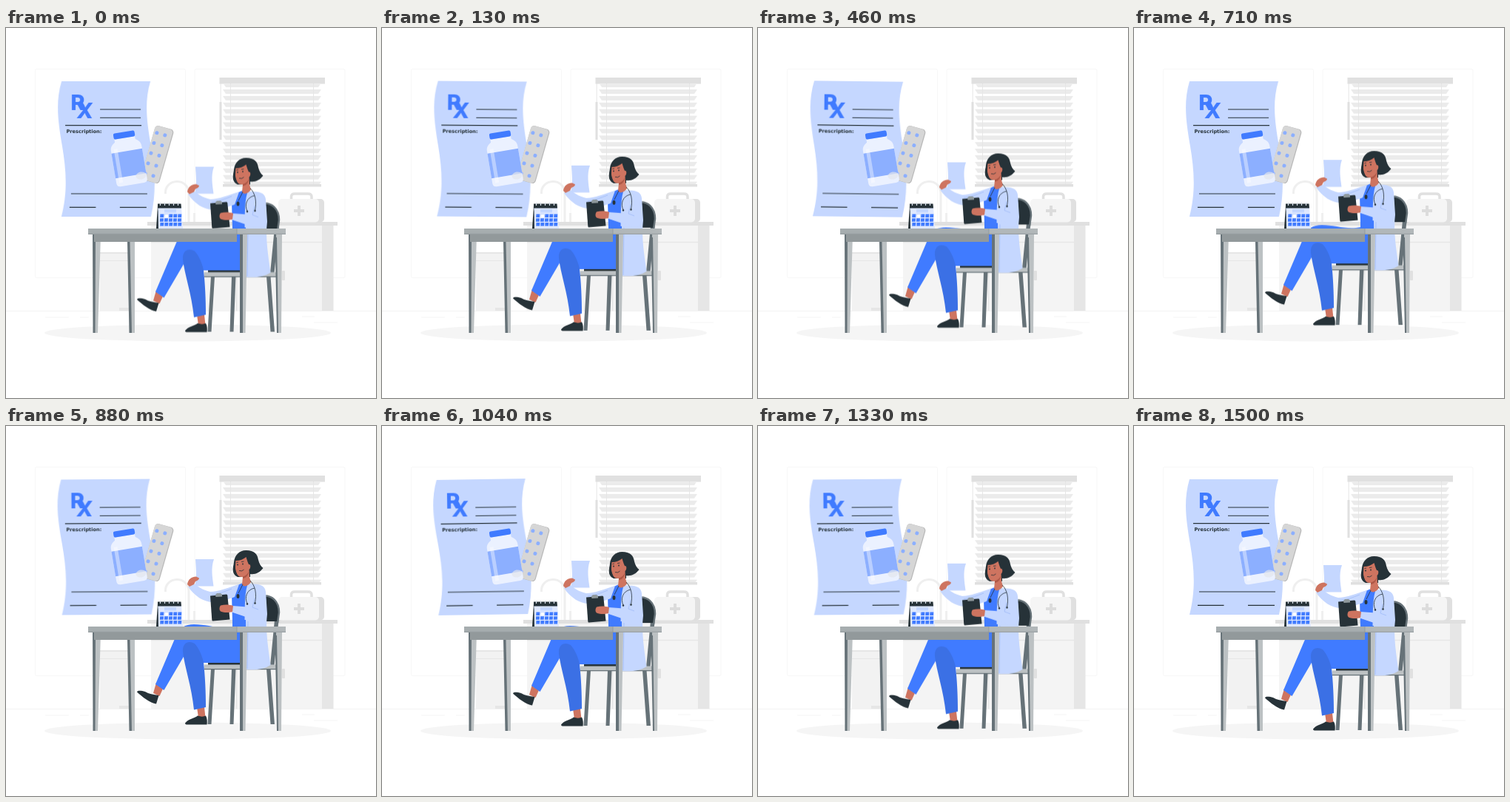
Animation, 500 px wide and 500 px high, one loop 1.54 s. Source, as an HTML page:

```html
<!DOCTYPE html>
<html lang="en">
<head>
<meta charset="utf-8">
<title>Doctor reading a prescription</title>
<style>
  html, body { margin: 0; width: 100%; height: 100%; overflow: hidden; background: #fff; }
  svg { display: block; width: 100%; height: 100%; }
  .float { animation: float 1540ms linear -40ms infinite; }
  .wind { animation: wind 1540ms linear -40ms infinite; transform-origin: 135px 163.5px; }
  @keyframes float { 50% { transform: translateY(-10px); } }
  @keyframes wind {
    0%, 100% { transform: rotate(0deg); }
    25% { transform: rotate(1deg); }
    75% { transform: rotate(-1deg); }
  }
  .pale { fill: #c5d7ff; }
  .blue { fill: #407bff; }
  .soft { fill: #8cafff; }
  .dark { fill: #263238; }
  .skin { fill: #ce7460; }
  .steel { fill: #667278; }
  .silver { fill: #bcc1c3; }
  .ink { fill: none; stroke: #263238; stroke-width: 1.1; }
  .thin { fill: none; stroke: #263238; stroke-width: .8; }
  .fold { fill: none; stroke: #94b2f5; stroke-width: .6; }
  .rx { font: 800 29px Inter, "Open Sans", sans-serif; }
  .label { font: 700 6.6px "DejaVu Sans", sans-serif; }
</style>
</head>
<body>
<svg viewBox="0 0 500 500">
  <defs>
    <pattern id="slats" x="293" y="74.100" width="133" height="8.900" patternUnits="userSpaceOnUse">
      <path d="M0 0H133L129 6H4Z" fill="#ebebeb"/>
    </pattern>
    <path id="cell" d="M0 0H4.800L4.500 4.400H-.3Z"/>
    <g id="pair"><circle cx="-5.700" r="2.500"/><circle cx="5.700" r="2.500"/></g>
    <g id="week">
      <use href="#cell"/><use href="#cell" x="6"/><use href="#cell" x="12"/>
      <use href="#cell" x="18"/><use href="#cell" x="24"/>
    </g>
  </defs>

  <!-- room -->
  <g fill="none" stroke="#f7f7f7">
    <rect x="39.500" y="55.500" width="203" height="282" rx="2"/>
    <rect x="255" y="55.500" width="203" height="282" rx="2"/>
    <path d="M0 382.500H500" stroke="#f2f2f2"/>
    <path d="M53 391H85M100 391H112M400 390H417M416 398H448" stroke="#f5f5f5"/>
  </g>
  <ellipse cx="245.500" cy="412" rx="193.500" ry="11.500" fill="#f5f5f5"/>

  <!-- blinds -->
  <rect x="293" y="76" width="133" height="135" fill="url(#slats)"/>
  <path d="M303.500 75V211M415.500 75V211" stroke="#e6e6e6"/>
  <path d="M288.500 67H431V75.500H288.500ZM293 211H426V214.500H293ZM288.500 100H291.500V151H288.500ZM289.700 75H290.500V100H289.700Z" fill="#e0e0e0"/>

  <!-- cabinets -->
  <path d="M127 303H166V382H127Z" fill="#f2f2f2"/>
  <path d="M127 303H166V305H127ZM127 314H166V315H127Z" fill="#e6e6e6"/>
  <path d="M153 378H172V382H153Z" fill="#e6e6e6"/>
  <path d="M196 267H428V382H196Z" fill="#f4f4f4"/>
  <path d="M427 267H442.500V382H427Z" fill="#e6e6e6"/>
  <path d="M196 289.500H427M311.500 290V382" stroke="#e6e6e6" stroke-width="1.500"/>
  <path d="M191 262H448V267H191Z" fill="#e0e0e0"/>
  <rect x="373" y="328" width="4" height="13" rx="1" fill="#e0e0e0"/>
  <path d="M215.500 224C214 203 247 201 247 224V262M254.500 250V262" fill="none" stroke="#efefef" stroke-width="3"/>
  <path d="M385.500 233V228Q385.500 224 390 224H408Q413 224 413 228V233" fill="none" stroke="#e0e0e0" stroke-width="3.500"/>
  <rect x="372" y="231" width="58" height="31.500" rx="5" fill="#e0e0e0"/>
  <rect x="368" y="231" width="55" height="31.500" rx="5" fill="#f5f5f5"/>
  <path d="M394 240H398V245H403V249H398V254H394V249H389V245H394Z" fill="#dcdcdc"/>

  <!-- prescription sheet -->
  <g class="wind">
    <path class="pale" d="M75 72H195C186 102 191 130 196 160S204 220 196 255H75C84 220 81 190 76 160S66 102 75 72Z"/>
    <text class="blue rx" x="87.200" y="111">R</text>
    <text class="blue rx" x="95" y="122" transform="translate(10.500) skewX(-5)">X</text>
    <path class="ink" d="M127 110H182M127 121.300H182M80 131.600H183M88 224H191M86 242.400H121.500M154 242.400H190"/>
    <text class="dark label" x="81.500" y="142.200">Prescription:</text>
  </g>

  <!-- blister pack -->
  <g transform="translate(204.500 171) rotate(16)">
    <rect x="-13" y="-38" width="26" height="76" rx="4.500" fill="#b8b8b8"/>
    <rect x="-13.200" y="-37.700" width="25" height="75.400" rx="4.500" fill="#d6d6d6"/>
    <g class="soft" transform="translate(-3 -28)">
      <use href="#pair"/><use href="#pair" y="14.300"/><use href="#pair" y="28.600"/>
      <use href="#pair" y="42.900"/><use href="#pair" y="57.200"/>
    </g>
  </g>

  <!-- bottle -->
  <g transform="translate(165.500 180) rotate(-9.500)">
    <path d="M-14 -32H14V-28C19 -25 21 -22 21 -17V27Q21 32 16 32H-16Q-21 32 -21 27V-17C-21 -22 -19 -25 -14 -28Z" fill="#ebf1ff"/>
    <path class="soft" d="M-21 -14H21V20H-21Z"/>
    <path d="M-17 -19H-12V27H-17Z" fill="#fff" opacity=".4"/>
    <rect class="blue" x="-14.500" y="-40" width="29" height="8" rx="2"/>
  </g>
  <ellipse cx="182.500" cy="199.500" rx="7" ry="5" transform="rotate(-12 182.500 199.500)" fill="#e3e6ec" opacity=".7"/>

  <!-- chair and doctor -->
  <g class="float">
    <path class="steel" d="M277 336H282L277.500 411H272.500ZM305 336H310.500L307.500 411H302.500ZM352 336H357.500L363 411H357.500ZM363 270H368.500L362.500 332H357Z"/>
    <path class="dark" d="M344 239C358 235 369 245 369 260L367 272H344Z"/>
    <path d="M345 238C360 235 369 246 369 260L367 274" fill="none" stroke="#667278" stroke-width="2.500"/>
    <path class="dark" d="M273 327H330V332H273Z"/>
    <path class="silver" d="M268 330.500H366V336.500H268Z"/>
    <path class="steel" d="M268 336H366V337.200H268Z"/>

    <path class="skin" d="M203 355L213 361L207.500 373L199 369Z"/>
    <path class="dark" d="M177 367.500C177 365 183 365.500 188 367C193 370 199 371 206.500 372L203 383.500C195 382.500 184 374 177 367.500Z"/>
    <path class="skin" d="M258 388H268L269.500 402H260Z"/>
    <path class="dark" d="M242 409.500C246 404 255 403 259 399.500C263 401 267 401 270 399.500C272 403 272 408 271.500 411.500H244Q242 411.500 242 409.500Z"/>
    <path class="blue" d="M326 262V328H262L241 318L213.500 365L202 357L230 291C234 281 242 276 254 276C272 276 288 283 306 279V262Z"/>
    <path d="M239 313C238 301 247 297 255 302C261 309 265 318 267 328C269 345 270 368 270 388L254 391.500C251 360 241 333 239 313Z" fill="#3b70e5"/>

    <path class="pale" d="M305 227C314 221 322 221 334 221.500C346 222 350 225 351 232L353 262C350 284 355 312 357.500 331C349 337 336 338 325 337L324 270H306Z"/>
    <path class="fold" d="M327 272L326 336"/>
    <path class="blue" d="M313 223L320 220L328 218C322 231 323 251 322.500 272H306L305 232Z"/>

    <path class="pale" d="M256 188H281C276.500 200 279 213 280.500 224.500H255C258.500 212 256.500 199 256 188Z"/>
    <path class="pale" d="M315 222C301 226 287 232 276 232C266 230 258 224 253 220L246 225C255 238 267 246 280 246C291 246 300 242 309 239Z"/>
    <path class="fold" d="M278 236C288 235 297 231 305 228"/>
    <path class="skin" d="M245 222C246 215 251 211.500 257 211.500L261 213.500Q261 216 256 218L254 222L248 225Z"/>

    <path class="dark" d="M276 237.500L298 235.500Q299 235.500 299.300 237L302.500 269.500L279.500 271.500Q278.500 271.500 278.300 270Z"/>
    <path d="M283 236L285 234H290L292 235.500V238.500L283.500 239Z" fill="#8f999d"/>
    <path class="pale" d="M335 228C342 222 350 227 351 240C352 250 352 260 349 268C345 274 338 271 330 268L305 259.500L306 251L333 253Z"/>
    <path class="fold" d="M333 253L336 241M333 253L341 256"/>
    <path class="skin" d="M307 251C302 249 295 249 290 250.500C288 253 288 257 290 258.500C296 261 302 260 306 259Z"/>

    <path class="dark" d="M308 192C309 182 316 175.500 325 176C335 176 340 181 341 189C342 194 345 198 347.500 200C343 206 337 209 330 208V212H313C308 210 306 205 307 199Z"/>
    <path class="skin" d="M310.500 190C316 190 321 188 324.500 185C326 190 327 193 328 195C331 194 331 200 328.500 202L329 212L331 219C327 225 321 226 319 222L320 212C314 213 310 207 309.800 200Z"/>
    <path d="M320 211.500C324 210.500 327 207.500 328.500 204C327 211 324 213.500 320 214Z" fill="#ad5746"/>
    <path class="dark" d="M310 188C309 196 309.500 204 314 211.500C308 210 306.500 205 307 199Z"/>
    <g class="dark"><circle cx="313" cy="195.500" r=".9"/><circle cx="320" cy="194.500" r=".9"/></g>
    <path class="thin" d="M311.500 192.500L314 192M318 191.500L321.500 191M315 203.500Q319 205 321.500 202"/>
    <path class="thin" d="M330 217C337 224 339 235 336.500 247M336 227C325 229 322 240 326 248M320 222L314 234"/>
    <ellipse class="dark" cx="313.500" cy="238" rx="2" ry="3"/>
    <circle class="dark" cx="326" cy="248.500" r="1.200"/>
    <circle class="dark" cx="336.500" cy="247.500" r="1.200"/>
  </g>

  <!-- table -->
  <path class="silver" d="M120 279H128L124 412H120ZM167 289H174L174 412H169ZM319 279H326L323.500 412H319ZM365 279H373L372 412H367Z"/>
  <path class="steel" d="M117 279H121L120.500 412H117.500ZM164 289H167.500L170 412H166.500ZM316 279H320V412H316ZM363.500 283H366L368 412H366Z"/>
  <path d="M119 279H312V289H119Z" fill="#92999b"/>
  <path d="M111 271H378V279H111Z" fill="#a6adaf"/>
  <path d="M312 271H378V279H312Z" fill="#b1b7b9"/>
  <path d="M111 278.300H378M312 271V279" stroke="#8b9395" stroke-width=".7"/>

  <!-- calendar -->
  <path class="dark" d="M205 240L209 271H203Z"/>
  <path d="M205.500 242H237L239 271H206Z" fill="#dfe8ff"/>
  <path class="dark" d="M205 237.500H236.500L237 243.500H205Z"/>
  <path d="M208.500 235.500V240M214.500 235.500V240M220.500 235.500V240M226.500 235.500V240M232.500 235.500V240" stroke="#dfe5ee" stroke-width="1.200"/>
  <path class="pale" d="M214 245H230V249.500H214Z"/>
  <g class="blue">
    <use href="#week" x="208.500" y="251.500"/>
    <use href="#week" x="208.200" y="257.300"/>
    <use href="#week" x="208.500" y="263"/>
  </g>
  <use href="#cell" x="214.500" y="251.500" fill="#fff"/>
</svg>
</body>
</html>
```
